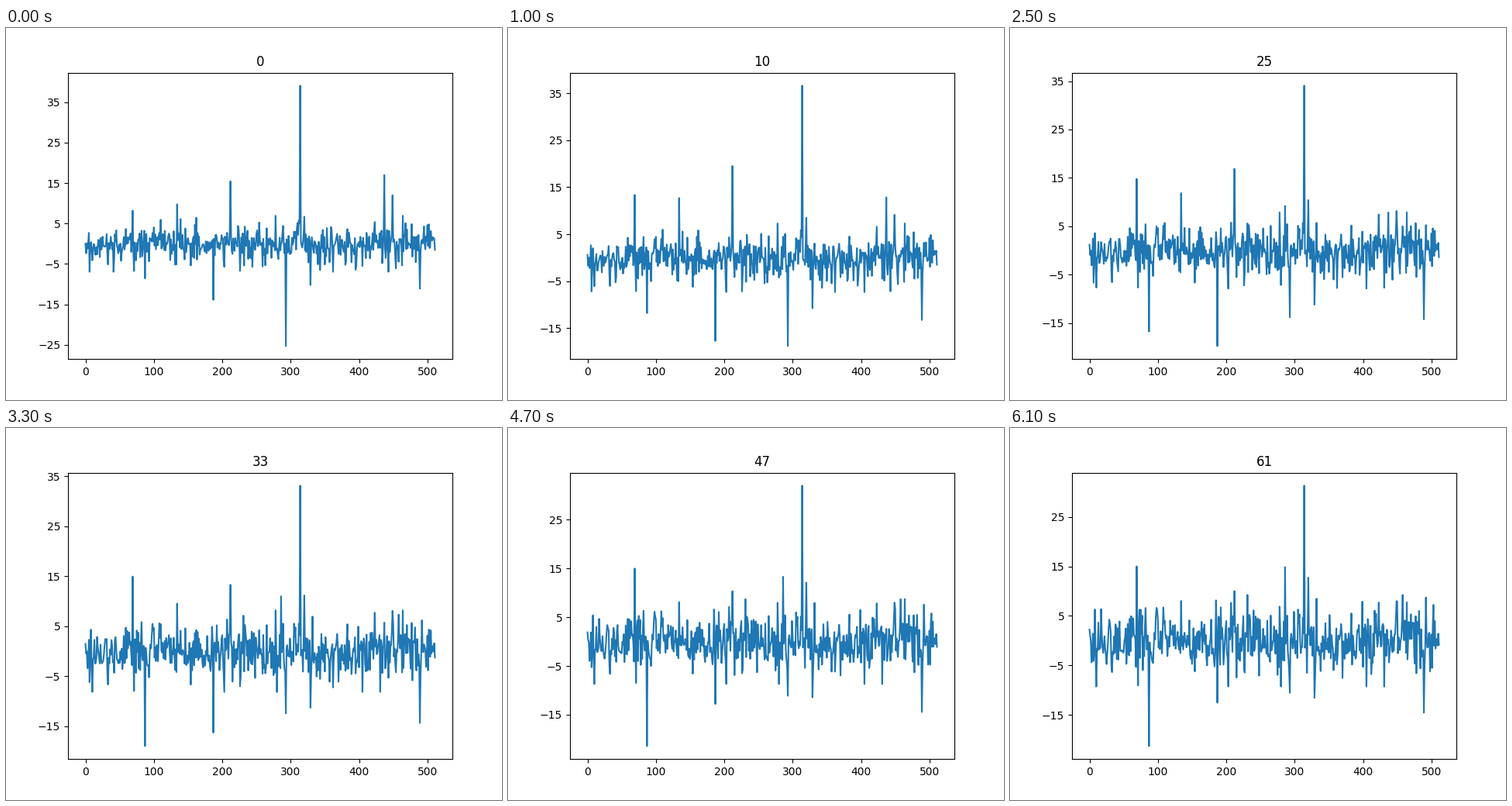
A matplotlib script for the animation above (6.2 s loop, 640x480 px).

```python
import numpy as np
import matplotlib.pyplot as plt
from matplotlib.animation import FuncAnimation
from matplotlib.ticker import FixedLocator

FRAMES = 62
INTERVAL = 100
SIZE = 512
NOISE_LIMIT = 3.3

rng = np.random.default_rng(7)
index = np.arange(SIZE)
start_noise, end_noise = rng.standard_t(5, size=(2, SIZE))


def bell(x, center, width, height):
    return height * np.exp(-((x - center) / width) ** 2)


def settle(step, start, end, tau):
    """Exponential approach from start towards end."""
    return end + (start - end) * np.exp(-step / tau)


trend = (bell(index, 100, 22, 1.2) + bell(index, 311, 5, 2.5)
         + bell(index, 335, 12, -0.8))


def noise(step):
    """Heavy-tailed noise that drifts quickly at first, then slowly."""
    progress = step / (FRAMES - 1)
    angle = 1.1 * progress ** 0.7
    mixed = start_noise * np.cos(angle) + end_noise * np.sin(angle)
    scale = 2.1 + 0.7 * progress
    return scale * np.clip(mixed, -NOISE_LIMIT, NOISE_LIMIT)


def signal(step):
    y = trend + noise(step)

    # Spikes that shrink or grow towards a resting height
    y[314] = settle(step, 39.1, 30, 31)
    y[293] = settle(step, -25.3, -10, 18)
    y[437] = settle(step, 17, -8, 55)
    y[449] = settle(step, 12, 8, 8)
    y[69] = settle(step, 8.2, 15, 7)
    y[286] = settle(step, 0, 18, 35)
    y[320] = settle(step, 6.7, 14, 35)
    y[329] = settle(step, -10.2, -11.6, 20)
    y[489] = settle(step, -11.1, -14.5, 10)

    # Spikes that swell and fall back
    y[212] = 10 + bell(step, 14, 18, 10)
    y[134] = 8 + bell(step, 16, 15, 5.5)
    y[187] = -12.5 + bell(step, 20, 15, -8.1)
    y[87] = bell(step, 53, 55, -21.7)
    return y


fig, ax = plt.subplots(figsize=(6.4, 4.8), dpi=100)
line, = ax.plot(index, signal(0))
ax.yaxis.set_major_locator(FixedLocator(np.arange(-25, 36, 10)))
title = ax.set_title("0")


def update(step):
    line.set_ydata(signal(step))
    ax.relim()
    ax.autoscale_view()
    title.set_text(str(step))
    return line, title


anim = FuncAnimation(fig, update, frames=FRAMES, interval=INTERVAL,
                     repeat=True, repeat_delay=0, blit=False)
plt.show()
```
